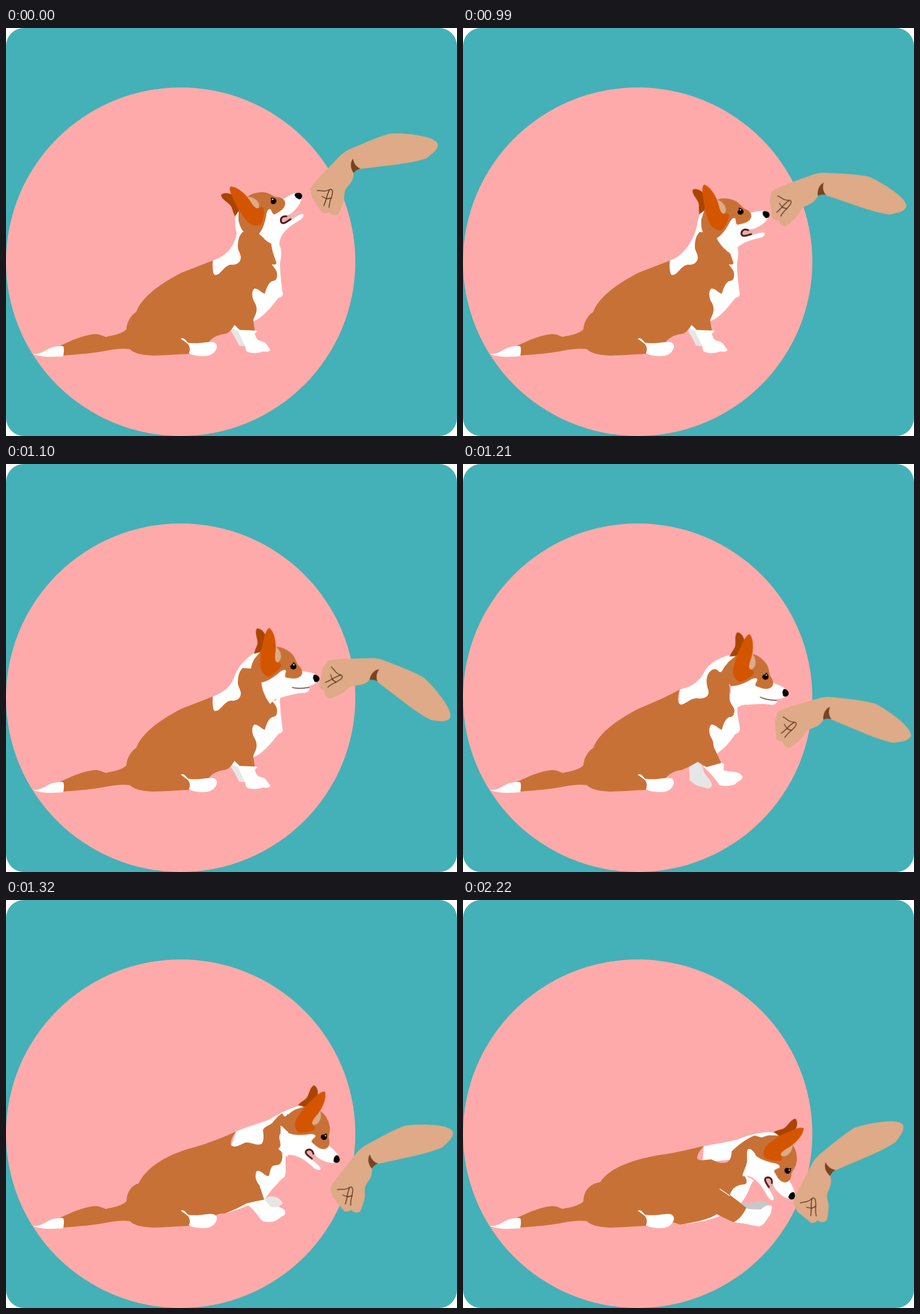
Recreate the animation shown at these times as an HTML page. Size 772 px wide and 700 px high, loop 2750 ms.

```html
<!DOCTYPE html>
<html lang="en">
<head>
<meta charset="utf-8">
<title>Corgi lies down</title>
<style>
  html, body { margin: 0; width: 100%; height: 100%; overflow: hidden; background: #fff; }
  svg { display: block; width: 100vw; height: 100vh; }

  .brown { fill: #c87137; }
  .white { fill: #fff; }
  .grey { fill: #e6e6e6; }
  .skin { fill: #deaa87; }
  .line { fill: none; stroke-linecap: round; stroke-linejoin: round; }

  #head, #hand, .sit, .neck, .lean, .crouch, .lie, .open, .shut {
    animation: 2750ms step-end infinite;
  }
  #head { transform-origin: 501px 288px; animation-name: head; }
  #hand { transform-origin: 596px 236px; animation-name: hand; }
  .sit { animation-name: sit; }
  .neck.a { animation-name: neckA; }
  .neck.b { animation-name: neckB; }
  .neck.c { animation-name: neckC; }
  .lean { animation-name: lean; }
  .crouch { animation-name: crouch; }
  .lie { animation-name: lie; }
  .open { animation-name: open; }
  .shut { animation-name: shut; }

  @keyframes head {
    0%  { transform: none; }
    36% { transform: translate(18px, 32px) rotate(18deg); }
    40% { transform: translate(30px, 80px) rotate(39.5deg); }
    44% { transform: translate(51px, 105px) rotate(51deg); }
    48% { transform: translate(65px, 157px) rotate(72.4deg); }
    52%, 100% { transform: translate(62px, 220px) rotate(92deg); }
  }
  @keyframes hand {
    0%  { transform: none; }
    36% { transform: translate(18px, 41px) rotate(26deg); }
    40% { transform: translate(36px, 126px) rotate(44.5deg); }
    44% { transform: translate(28px, 192px) rotate(29.7deg); }
    48% { transform: translate(30px, 212px) rotate(-5.5deg); }
    52%, 100% { transform: translate(30px, 225px) rotate(-16.2deg); }
  }
  @keyframes sit    { 0% { opacity: 1; } 44%, 100% { opacity: 0; } }
  @keyframes neckA  { 0% { opacity: 1; } 36%, 100% { opacity: 0; } }
  @keyframes neckB  { 0% { opacity: 0; } 36% { opacity: 1; } 40%, 100% { opacity: 0; } }
  @keyframes neckC  { 0% { opacity: 0; } 40% { opacity: 1; } 44%, 100% { opacity: 0; } }
  @keyframes lean   { 0% { opacity: 0; } 44% { opacity: 1; } 48%, 100% { opacity: 0; } }
  @keyframes crouch { 0% { opacity: 0; } 48% { opacity: 1; } 52%, 100% { opacity: 0; } }
  @keyframes lie    { 0% { opacity: 0; } 52%, 100% { opacity: 1; } }
  @keyframes open   { 0% { opacity: 1; } 40% { opacity: 0; } 48%, 100% { opacity: 1; } }
  @keyframes shut   { 0% { opacity: 0; } 40% { opacity: 1; } 48%, 100% { opacity: 0; } }
</style>
</head>
<body>
<svg viewBox="0 0 772 700" preserveAspectRatio="none">
  <rect width="772" height="700" rx="31" fill="#43b1b7"/>
  <circle cx="299" cy="401" r="299" fill="#faa"/>

  <!-- tail and rump -->
  <path class="brown" d="M90 546C108 539 130 526 155 525C162 526 167 529 171 530C185 527 200 524 206 517L300 500L314 559C290 560 270 562 250 562C235 561 220 559 212 551C200 549 185 551 175 553C150 558 125 560 97 562Z"/>
  <path class="white" d="M46 559C62 561 70 549 82 547C88 546 93 545 98 546C100 551 99 557 98 563C80 565 58 565 46 559Z"/>

  <!-- sitting -->
  <g class="sit">
    <path class="grey" d="M383 517L391 511L400 520L410 546L399 545L392 531Z"/>
    <path class="white" d="M387 515L391 510L431 520L426 524C428 536 434 537 440 538C446 540 447 546 453 552C450 557 444 555 440 555C430 559 418 558 412 555C409 550 411 548 408 543L397 520Z"/>
    <path class="white" d="M440 360L468 372C474 385 470 395 469 405C469 420 472 445 474 457C472 464 466 461 464 466C452 481 440 496 424 503L415 440Z"/>
    <path class="neck a white" d="M354 399C374 392 389 380 395 353C391 338 391 320 397 312L410 345V395L385 420L355 424Z"/>
    <path class="neck b white" d="M354 399C378 391 395 365 401 337C403 322 408 313 415 310L420 345L410 395L385 420L355 424Z"/>
    <path class="neck c white" d="M354 399C372 392 384 383 390 367C400 340 420 325 437 319L440 355L410 395L385 420L355 424Z"/>
    <path class="brown" d="M206 517C207 503 215 492 223 487C231 466 254 444 300 420L354 399C352 410 354 423 358 424C368 424 372 408 385 406C395 407 402 402 402 393C401 385 396 381 397 373C397 365 399 356 405 350L434 352C440 361 447 367 454 370C455 382 460 394 463 403C462 408 458 404 455 406C460 412 465 418 464 424C464 432 460 434 456 434C449 437 446 446 443 456C438 455 433 447 425 447C420 452 421 461 424 468C430 477 430 485 427 492L423 501L426 519L400 518L391 509C386 519 380 524 374 525C362 526 352 532 347 539L330 548L313 559L230 550Z"/>
  </g>

  <!-- leaning forward -->
  <g class="lean">
    <path class="grey" d="M387 516L402 511C409 515 411 522 413 530C418 537 425 543 426 551C425 558 418 557 413 555C400 553 395 548 388 543Z"/>
    <path class="white" d="M411 519L442 512L447 515L446 525C455 530 472 524 479 537C475 545 470 544 465 550C456 553 445 553 439 551C432 540 423 530 411 519Z"/>
    <path class="white" d="M450 380L470 415C468 430 474 445 474 456C472 464 466 461 464 466C455 480 445 490 433 498L415 445Z"/>
    <path class="white" d="M371 387C396 381 406 371 415 353C428 336 448 328 469 326L470 360L430 400L390 412L369 413Z"/>
    <path class="brown" d="M206 517C207 503 215 492 223 487C231 466 254 444 300 420C324 410 350 399 371 387C366 400 367 411 373 413C382 412 388 402 400 402C415 404 422 398 420 388C416 378 416 366 420 360C424 353 431 349 437 355C443 362 445 350 450 345L480 350L455 378C459 390 454 402 458 409C460 415 467 419 464 427C463 433 460 434 456 434C449 437 446 446 443 456C438 455 433 447 425 447C420 452 421 461 424 468C430 477 428 482 430 487L442 513L417 520L402 511L386 520L374 525C362 526 352 532 347 539L330 548L313 559L230 550Z"/>
  </g>

  <!-- crouching -->
  <g class="crouch">
    <path class="white" d="M374 538L412 521L442 513L476 531C480 536 478 540 474 542C468 545 462 552 455 552C447 553 441 553 437 549C430 540 424 531 415 524C404 528 390 534 374 538Z"/>
    <path class="grey" d="M442 513C450 506 460 509 465 511C470 514 473 518 473 521C468 527 458 529 452 526Z"/>
    <path class="white" d="M460 425L479 439C477 450 481 465 477 475C470 479 465 487 455 497L442 514L420 465Z"/>
    <path class="white" d="M394 397C415 388 432 384 450 377C470 365 490 354 514 351L510 365L470 390L440 420L385 424Z"/>
    <path class="brown" d="M206 517C207 500 215 490 227 486C240 460 270 440 312 427C342 419 368 409 394 397C388 404 383 416 385 421C394 426 400 420 410 416C420 415 430 423 438 418C443 410 440 400 440 394C444 387 453 387 458 380C464 372 469 368 473 366C477 375 480 371 482 367L500 380L484 405L466 427C472 430 475 437 472 447C468 459 460 452 455 458C451 464 452 471 449 474C442 473 437 463 429 465C425 475 428 482 434 490L442 514L412 520C400 527 390 532 374 538C368 537 362 539 358 542L330 548L313 559L230 550Z"/>
    <path class="white" d="M470 387C475 389 479 396 485 399L482 441L466 427C476 420 463 410 470 400Z"/>
  </g>

  <!-- lying -->
  <g class="lie">
    <path fill="#c8c8c8" d="M474 522C480 518 487 520 494 520C505 516 512 515 520 519L525 525C515 531 500 533 484 531Z"/>
    <path class="white" d="M372 557L430 530L442 541C425 549 398 554 372 557Z"/>
    <path class="white" d="M462 553L483 528C490 532 500 530 510 531C516 525 524 521 529 526C528 535 527 540 522 545C518 552 513 560 505 560C490 557 475 553 462 553Z"/>
    <path class="white" d="M455 490L479 470L498 481C490 490 490 503 476 520L455 506Z"/>
    <path class="white" d="M412 422C432 419 452 415 470 411C486 404 504 399 525 398L545 402L510 412L465 445L410 450Z"/>
    <path class="brown" d="M206 517C207 498 217 487 235 484C250 460 290 445 340 437C368 433 390 427 412 422C405 430 400 438 401 444C408 449 415 445 425 445C435 450 443 453 452 450C460 445 459 437 460 431C470 422 482 411 499 404L520 410L510 450L484 457C480 463 479 470 482 474C487 481 487 488 480 488C471 489 461 492 457 506L485 528C480 539 472 549 463 553L434 539C422 548 396 553 372 557L360 553L313 559L230 550Z"/>
    <path class="white" d="M487 429C490 424 496 429 502 438V472L479 474C477 468 484 464 484 457C489 445 484 436 487 429Z"/>
    <path class="line" d="M440 496L456 507" stroke="#fff" stroke-width="1.5"/>
  </g>

  <!-- back foot -->
  <path class="white" d="M299 533C305 530 308 537 312 540C325 542 335 540 345 539C356 537 362 541 361 548C358 558 350 563 338 563C328 563 318 561 313 558C316 552 315 545 310 541Z"/>

  <g id="head">
    <path fill="#a40" d="M368 287C371 282 382 282 390 288L404 306L392 323C389 318 388 312 386 307C382 299 371 297 368 287Z"/>
    <path class="white" d="M440 310L477 292C485 287 491 284 497 283L506 292C504 303 496 312 487 319C480 322 473 324 471 332L484 332L476 350C470 358 468 365 468 372C452 368 441 361 433 353Z"/>
    <g class="open">
      <path fill="#f4b4b4" d="M474 331C474 323 483 323 489 318L506 313L508 320L487 330Z"/>
      <path class="white" d="M474 336C488 332 498 320 508 319C511 322 508 326 504 329C494 335 482 342 475 352L462 350Z"/>
      <path fill="#e9afaf" d="M473 332C472 324 480 324 487 321L489 327C483 331 476 337 473 332Z"/>
      <path class="line" stroke="#501616" stroke-width="3" d="M480 323C472 322 469 328 471 333C474 338 481 332 487 328"/>
    </g>
    <g class="shut">
      <path class="white" d="M462 335L498 307L504 309C505 314 504 317 501 320C491 328 483 341 475 352Z"/>
      <path class="line" stroke="#501616" stroke-width="1.2" d="M479 326C488 322 494 316 501 308"/>
    </g>
    <path class="brown" d="M398 312C403 298 410 291 416 288C422 283 434 281 442 282C452 283 457 289 463 290C470 290 477 293 478 300C478 308 472 313 463 318C457 323 456 316 453 311C450 309 448 312 446 318C444 332 440 345 433 353L410 352C405 350 400 340 398 330Z"/>
    <path class="skin" d="M409 291C418 287 431 294 433 302C434 307 432 312 428 313C419 309 414 298 409 291Z"/>
    <path fill="#d45500" d="M384 272C392 271 405 280 413 290C419 297 422 305 428 309C432 311 437 304 441 309C443 318 440 331 437 337C430 341 420 339 413 332C404 321 396 309 391 297C386 288 381 277 384 272Z"/>
    <path d="M494 286C495 282 502 282 505 284C509 288 506 294 502 294C498 292 495 291 494 286Z"/>
    <path d="M453 291C457 291 462 292 463 296C463 300 460 303 456 302C452 301 453 297 454 295Z"/>
    <circle class="white" cx="456.5" cy="294" r="1.2"/>
  </g>

  <g id="hand">
    <path class="skin" d="M521 278C520 274 534 258 542 250L572 219C580 211 590 207 600 203C620 194 640 186 658 181C680 180 700 183 715 186C733 190 741 197 739 202C738 210 728 217 719 224C702 229 686 232 670 234L605 242C597 243 596 246 595 250C595 262 588 268 582 276C578 282 580 290 578 298C575 306 571 316 568 320C563 323 557 321 553 316C549 318 546 319 541 317C538 312 533 305 524 292Z"/>
    <path fill="#784421" d="M594 224C595 232 601 240 607 241C600 243 597 246 595 249C589 240 589 230 594 224Z"/>
    <g class="line" stroke="#502d16" stroke-width="1.3">
      <path d="M533 279C540 278 546 282 552 278C556 275 559 277 559 281C559 290 553 297 553 308"/>
      <path d="M554 278C549 285 549 294 544 305M541 289L549 293L557 292"/>
    </g>
  </g>
</svg>
</body>
</html>
```
